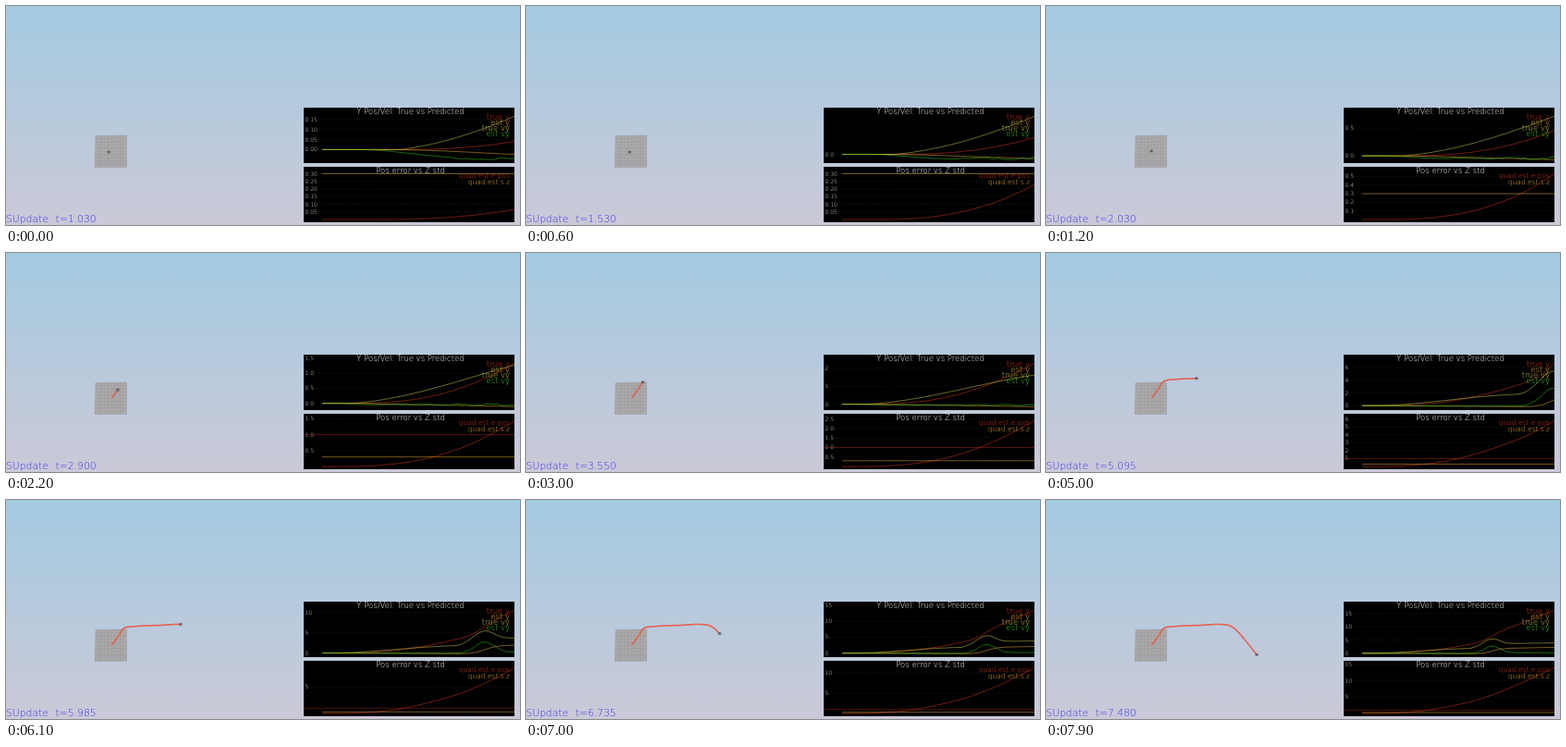
An HTML page with a canvas that plays this animation: 556 by 237 pixels, repeating every 8 s.

```html
<!DOCTYPE html>
<html lang="en">
<head>
<meta charset="utf-8">
<title>Quad estimator</title>
<style>
  html, body { margin: 0; width: 100%; height: 100%; overflow: hidden; }
  canvas { display: block; }
</style>
</head>
<body>
<canvas id="stage" width="556" height="237"></canvas>
<script>
const ctx = document.getElementById('stage').getContext('2d');
const LOOP = 8000, STEP = 100, END = 7.6, DT = .005;
const LEFT = 322, RIGHT = 550, CURVE_LEFT = 342;

// Rows of [key, value, ...]: the simulation runs at a slightly uneven pace
const clock = [[0, 1.03], [1200, 2.03], [2200, 2.9], [3800, 4.2], [5000, 5.095], [6100, 5.985], [7900, 7.48]];
// Flight path as [time, x, y]
const path = [
  [1, 111, 158], [2.03, 114, 157], [2.9, 121, 148], [3.6, 127, 139.3], [4.2, 136, 137],
  [5.1, 163, 135.7], [6.2, 195, 135], [6.6, 206, 141], [7.5, 228.5, 168]
];

function locate(keys, t) {
  let i = 0;
  while (i < keys.length - 2 && t > keys[i + 1][0]) i++;
  return [i, (t - keys[i][0]) / (keys[i + 1][0] - keys[i][0])];
}

function linear(keys, t) {
  const [i, s] = locate(keys, t);
  return keys[i][1] + (keys[i + 1][1] - keys[i][1]) * s;
}

function smooth(keys, t, col) {
  const [i, s] = locate(keys, t), q = 1 - s;
  const h = keys[i + 1][0] - keys[i][0];
  const slope = k => {
    const p = keys[Math.max(0, k - 1)], n = keys[Math.min(keys.length - 1, k + 1)];
    return (n[col] - p[col]) / (n[0] - p[0]);
  };
  return (1 + 2 * s) * q * q * keys[i][col] + s * q * q * h * slope(i)
    + s * s * (3 - 2 * s) * keys[i + 1][col] - s * s * q * h * slope(i + 1);
}

// Signals: velocities are sums of ramps and bumps, positions their integrals
function ramp(t, start, length) {
  const s = Math.min(1, Math.max(0, (t - start) / length));
  return s * s * (3 - 2 * s);
}
const bump = (t, center, width) => Math.exp(-(((t - center) / width) ** 2));

function integrate(fn) {
  const sums = [0];
  for (let i = 1; i * DT <= END; i++) sums[i] = sums[i - 1] + fn((i - .5) * DT) * DT;
  return t => sums[Math.round(t / DT)];
}

const trueVy = t => .12 * Math.max(0, t - .42) + 1.35 * ramp(t, .42, 3.8)
  + 1.7 * ramp(t, 4.1, .8) + 1.85 * bump(t, 5.08, .38);
const estVy = t => -.045 * ramp(t, .2, .6) + .25 * ramp(t, 4.25, .8) + 2.5 * bump(t, 5.06, .42)
  + ramp(t, .2, 3) * (.012 * Math.sin(t * 41) + .012 * Math.sin(t * 67) + .03 * Math.sin(t * 13));
const trueY = integrate(trueVy), estY = integrate(estVy);
const posError = t => Math.abs(trueY(t) - estY(t));

const RED = '#d93a16', GOLD = '#eeb030', YELLOW = '#d2d04a', GREEN = '#35cc18';
const plots = [
  {
    top: 110, base: 166.3, height: 47, title: 'Y Pos/Vel: True vs Predicted',
    steps: [.05, .1, .5, 1, 2, 5], minGap: 10.5, legendY: 122.8, legendSize: 8.5,
    series: [['true y', RED, trueY], ['est y', GOLD, estY], ['true vy', YELLOW, trueVy], ['est vy', GREEN, estVy]]
  },
  {
    top: 174, base: 231, height: 49.5, title: 'Pos error vs Z std',
    steps: [.05, .1, .5, 1, 5], minGap: 8, legendY: 186.3, legendSize: 7.5, limit: 1,
    series: [['quad.est.e.pos', RED, posError], ['quad.est.s.z', GOLD, () => .3]]
  }
];

function text(str, x, y, size, color, align = 'left') {
  ctx.font = `200 ${size}px "DejaVu Sans", sans-serif`;
  ctx.textAlign = align;
  ctx.fillStyle = color;
  ctx.fillText(str, x, y);
}

function line(points, color, width = 1, dash = []) {
  ctx.beginPath();
  points.forEach(([x, y]) => ctx.lineTo(x, y));
  ctx.setLineDash(dash);
  ctx.strokeStyle = color;
  ctx.lineWidth = width;
  ctx.stroke();
}

function drawPlot({ top, base, height, title, steps, minGap, legendY, legendSize, limit, series }, now) {
  const curves = series.map(([, color, fn]) => {
    const points = [];
    for (let x = CURVE_LEFT; x <= RIGHT; x += 2)
      points.push([x, fn((x - CURVE_LEFT) / (RIGHT - CURVE_LEFT) * now)]);
    return { color, points };
  });

  // The vertical axis always fits every curve
  const values = curves.flatMap(c => c.points.map(p => p[1]));
  const low = Math.min(0, ...values), scale = height / (Math.max(...values) - low);
  const toY = v => base - (v - low) * scale;
  const across = v => [[LEFT, toY(v)], [RIGHT, toY(v)]];

  ctx.save();
  ctx.beginPath();
  ctx.rect(LEFT, top, RIGHT - LEFT, 60);
  ctx.clip();
  ctx.fillStyle = '#000';
  ctx.fillRect(LEFT, top, RIGHT - LEFT, 60);

  const step = steps.find(s => s * scale >= minGap) || steps.at(-1);
  const digits = step < .1 ? 2 : step < 1 ? 1 : 0;
  for (let v = limit ? step : 0; toY(v) > top + 2.5; v += step) {
    line(across(v), '#262626', .6, [1, 2]);
    text(v.toFixed(digits), 323.5, toY(v) + 2, 6, '#eee');
  }
  ctx.globalAlpha = .6;
  if (limit) line(across(limit), '#a02812', .8);
  for (const { color, points } of curves)
    line(points.map(([x, v]) => [x, toY(v)]), color, .85);
  ctx.globalAlpha = 1;

  text(title, 437.5, top + 7.2, 8.5, '#fff', 'center');
  series.forEach(([name, color], i) =>
    text(name, 545, legendY + i * 6.2, legendSize, color, 'right'));
  ctx.restore();
}

function drawGround() {
  const at = (u, v) => [97 + 33.5 * u - v * (1 - u), 140.5 + v * (34 + u * .5) - u * .5];
  ctx.beginPath();
  [[0, 0], [1, 0], [1, 1], [0, 1]].forEach(p => ctx.lineTo(...at(...p)));
  ctx.fillStyle = '#aba9ab';
  ctx.fill();
  for (let i = 0; i <= 10; i++) {
    const k = i / 10, color = `rgba(115,110,112,${i % 2 ? .12 : .27})`;
    line([at(k, 0), at(k, 1)], color, .7);
    line([at(0, k), at(1, k)], color, .7);
  }
}

function drawFlight(now) {
  const place = t => [smooth(path, t, 1), smooth(path, t, 2)];
  const [x, y] = place(now);
  const trail = [];
  for (let t = 2.03; t < now; t += .04) trail.push(place(t));
  if (trail.length) {
    trail.push([x, y]);
    line(trail, '#e8543f', 1.5);
    line(trail, '#f09a84', .8, [1, 2.5]);
  }
  ctx.fillStyle = 'rgba(90,88,105,.55)';
  ctx.fillRect(x - 1.8, y - 1.5, 3.6, 3);
  ctx.fillStyle = '#55535e';
  ctx.fillRect(x - .8, y - .8, 1.6, 1.6);
}

const sky = ctx.createLinearGradient(0, 0, 0, 237);
sky.addColorStop(0, '#a3cae1');
sky.addColorStop(.5, '#b7cadd');
sky.addColorStop(1, '#cbc9d7');

function draw(ms) {
  const now = Math.round(linear(clock, ms) / DT) * DT;
  ctx.fillStyle = sky;
  ctx.fillRect(0, 0, 556, 237);
  drawGround();
  drawFlight(now);
  plots.forEach(plot => drawPlot(plot, now));
  text('SUpdate', 0, 233.5, 10.8, '#3c36f0');
  text('t=' + now.toFixed(3), 53.5, 233.5, 10.8, '#3c36f0');
}

const start = performance.now();
function frame() {
  const ms = (performance.now() - start) % LOOP;
  draw(Math.floor(ms / STEP) * STEP);
  requestAnimationFrame(frame);
}
frame();
</script>
</body>
</html>
```
